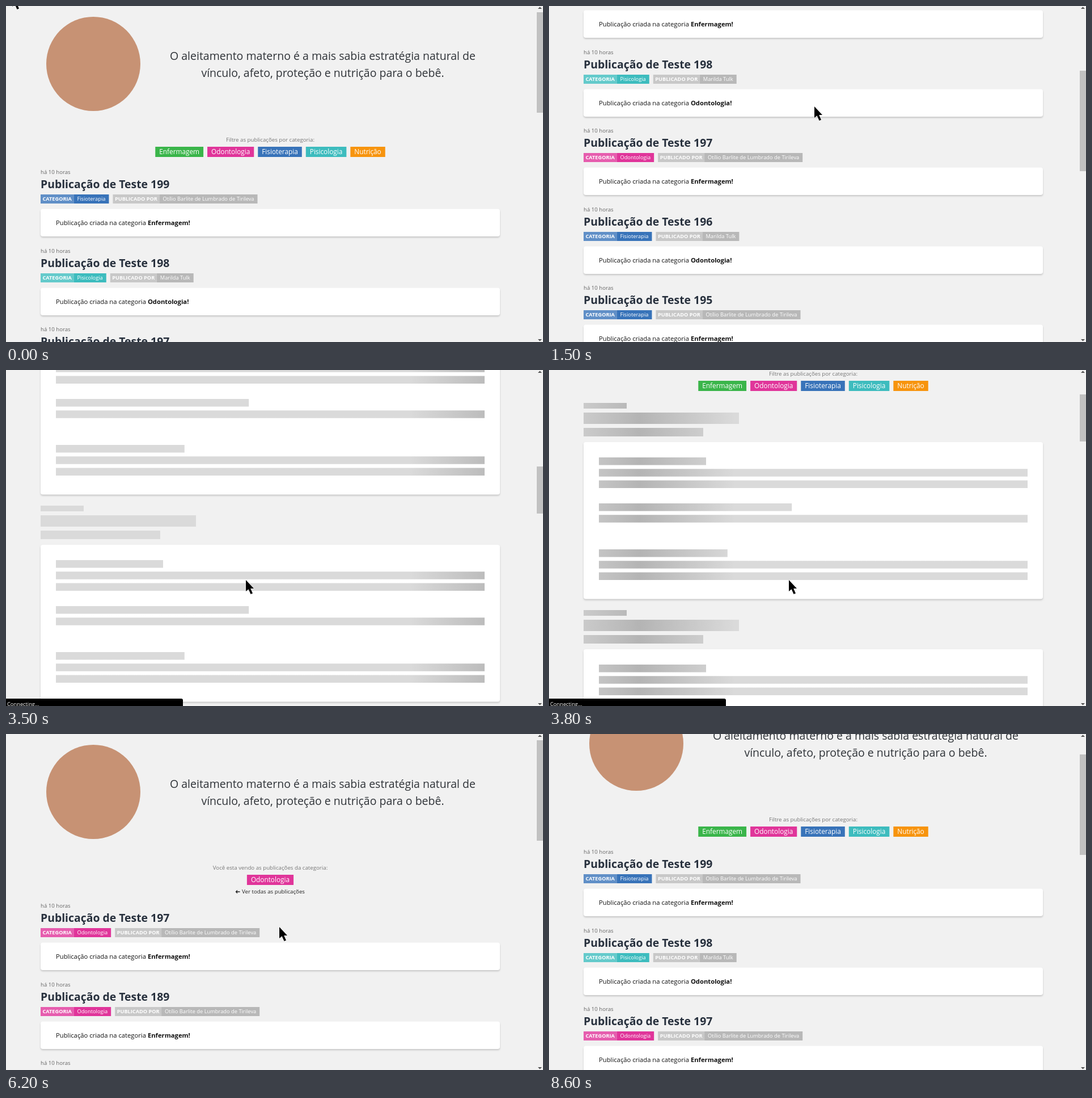
These frames come from a looping animation (947 by 592 pixels, 8900 ms). An HTML page with a canvas:

```html
<!DOCTYPE html>
<html lang="pt-BR">
<head>
<meta charset="utf-8">
<title>Publicações</title>
<style>
  html, body { margin: 0; width: 100%; height: 100%; overflow: hidden; background: #f1f1f1; }
  canvas { display: block; }
</style>
</head>
<body>
<canvas id="stage" width="947" height="592"></canvas>
<script>
const ctx = document.getElementById('stage').getContext('2d');
const W = 947, H = 592, LOOP = 8900, STEP = 100;
const LEFT = 61, CARD_W = 810, CENTER = 466;
const POST_GAP = 138.6, SKELETON_GAP = 365.5, ROW = 20.25;
const FONT = '"Open Sans", "Noto Sans", sans-serif';
const PINK = '#e0359a';

const COLORS = {
  Enfermagem: '#3ab54a',
  Odontologia: PINK,
  Fisioterapia: '#3873b9',
  Pisicologia: '#3dbcbe',
  Nutrição: '#f7940e'
};
const NAMES = Object.keys(COLORS);
const AUTHORS = ['Marilda Tulk', 'Otílio Barlite de Lumbrado de Tirileva'];

// Each letter is the initial of a category.
const makePosts = (first, initials, step = 1) => [...initials].map((c, i) =>
  ({ id: first - i * step, cat: NAMES.find(n => n[0] === c) }));
const PAGE_1 = makePosts(199, 'FPOFFEOPFP');
const PAGE_2 = makePosts(189, 'OEFPNOEFPO');
const FILTERED = makePosts(197, 'O'.repeat(10), 8);

const linear = p => p;
const easeOut = p => 1 - (1 - p) ** 3;
const easeInOut = p => p * p * (3 - 2 * p);
const clamp = p => Math.min(1, Math.max(0, p));
const within = (t, a, b) => t >= a && t < b;

// Moves run one after another; each starts where the last one ended.
const move = (start, end, to, ease = easeInOut) => ({ start, end, to, ease });
const SCROLL = [
  move(900, 1700, [467], linear),
  move(1880, 2886, [1333], easeOut),
  move(3358, 3958, [0]),
  move(6300, 6700, [85])
];
const POINTER = [
  move(200, 600, [468, 177]),
  move(2000, 2400, [462, 185]),
  move(2900, 3200, [423, 370]),
  move(4200, 4900, [389, 253]),
  move(5700, 6200, [482, 340]),
  move(6800, 7300, [460, 188]),
  move(8400, 8600, [300, -40])
];

const follow = (moves, origin, t) => moves.reduce((at, m) => {
  const p = m.ease(clamp((t - m.start) / (m.end - m.start)));
  return at.map((v, i) => v + (m.to[i] - v) * p);
}, origin);

function rect(x, y, w, h, fill) {
  ctx.fillStyle = fill;
  ctx.fillRect(x, y, w, h);
}

function box(x, y, w, h, r, fill, stroke) {
  ctx.beginPath();
  ctx.roundRect(x, y, w, h, r);
  ctx.fillStyle = fill;
  ctx.fill();
  if (stroke) {
    ctx.strokeStyle = stroke;
    ctx.lineWidth = 1;
    ctx.stroke();
  }
}

function card(x, y, w, h) {
  ctx.save();
  ctx.shadowColor = 'rgba(0,0,0,.18)';
  ctx.shadowBlur = 3;
  ctx.shadowOffsetY = 2;
  box(x, y, w, h, 4, '#fff');
  ctx.restore();
}

// Draws a string and returns its width.
function text(s, x, y, size, fill, weight = 400, align = 'left') {
  ctx.font = `${weight} ${size}px ${FONT}`;
  ctx.textAlign = align;
  ctx.fillStyle = fill;
  ctx.fillText(s, x, y);
  return ctx.measureText(s).width;
}

const centered = (s, x, y, size, fill, weight) => text(s, x, y, size, fill, weight, 'center');

// Draws a padded label and returns its right edge.
function tag(s, x, y, h, { size, pad, fill, weight = 400, base, tint = 0 }) {
  ctx.font = `${weight} ${size}px ${FONT}`;
  const w = ctx.measureText(s).width + pad * 2;
  rect(x, y, w, h, fill);
  if (tint) rect(x, y, w, h, `rgba(255,255,255,${tint})`);
  text(s, x + pad, y + base, size, '#fff', weight);
  return x + w;
}

function filterRow(names) {
  const pad = 7, gap = 7, size = 11.8;
  ctx.font = `400 ${size}px ${FONT}`;
  const total = names.reduce((sum, n) => sum + ctx.measureText(n).width + pad * 2 + gap, -gap);
  names.reduce((x, n) =>
    tag(n, x, 248, 18, { size, pad, fill: COLORS[n], base: 13.2 }) + gap, CENTER - total / 2);
}

function backLink() {
  ctx.beginPath();
  ctx.moveTo(412.5, 278);
  ctx.lineTo(405.5, 278);
  ctx.moveTo(408, 275.5);
  ctx.lineTo(405.5, 278);
  ctx.lineTo(408, 280.5);
  ctx.strokeStyle = '#222';
  ctx.lineWidth = 1.3;
  ctx.stroke();
  text('Ver todas as publicações', 416, 281, 9.7, '#222');
}

function header(filtered, hover) {
  ctx.beginPath();
  ctx.arc(154, 102, 83, 0, Math.PI * 2);
  ctx.fillStyle = '#c79274';
  ctx.fill();
  centered('O aleitamento materno é a mais sabia estratégia natural de', 558.5, 95, 19.5, '#2f3338');
  centered('vínculo, afeto, proteção e nutrição para o bebê.', 558.5, 125, 19.5, '#2f3338');
  if (hover) box(244.5, 223.5, 443, 56, 4, '#fff', '#e4e4e4');
  const caption = filtered ? 'Você esta vendo as publicações da categoria:' : 'Filtre as publicações por categoria:';
  centered(caption, CENTER, 239, 9.7, '#777');
  filterRow(filtered ? ['Odontologia'] : NAMES);
  if (filtered) backLink();
}

function post({ id, cat }, y) {
  const odd = id % 2, fill = COLORS[cat];
  text('há 10 horas', LEFT, y + 4, 9.65, '#666');
  text('Publicação de Teste ' + id, LEFT, y + 29, 19.4, '#27303d', 700);

  const label = { size: 9.2, pad: 3.5, weight: 700, base: 11 };
  const value = { size: 9.3, pad: 6, base: 10.5 };
  let x = tag('CATEGORIA', LEFT, y + 40, 16, { ...label, fill, tint: .2 });
  x = tag(cat, x, y + 40, 16, { ...value, fill }) + 7;
  x = tag('PUBLICADO POR', x, y + 40, 16, { ...label, fill: '#c8c8c8' });
  tag(AUTHORS[odd], x, y + 40, 16, { ...value, fill: '#b8b8b8' });

  card(LEFT, y + 65.5, CARD_W, 48.5);
  const w = text('Publicação criada na categoria ', 88, y + 94, 11.26, '#111');
  text(odd ? 'Enfermagem!' : 'Odontologia!', 88 + w, y + 94, 11.26, '#111', 700);
}

function pagination(y, current) {
  card(320, y, 292, 41.5);
  const button = (x, w, label, on) => {
    box(x + .5, y + 7.5, w - 1, 27, 2, on ? PINK : '#fff', on ? PINK : '#ddd');
    centered(label, x + w / 2, y + 24, 11.3, on ? '#fff' : '#222', 500);
  };
  button(328, 39, '‹');
  for (let n = 1; n <= 5; n++) button(343.5 + n * 35.5, 32, n, n === current);
  button(564.5, 39, '›');
}

function footer(y) {
  rect(0, y - 3, 935, 3, '#e6e6e6');
  rect(0, y, 935, 200, '#fff');
}

function paragraph(row, y, share, lines, fill) {
  const full = CARD_W - 54;
  for (let i = 0; i <= lines; i++)
    rect(88, y + (row + i) * ROW, i ? full : full * share, 13.5, fill);
}

function skeleton(t) {
  const mid = 88 + ((t - 2510) * .8) % 960;
  const shine = ctx.createLinearGradient(mid - 168, 0, mid + 168, 0);
  ['#dadada', '#b4b4b4', '#dadada'].forEach((c, i) => shine.addColorStop(i / 2, c));
  for (let i = 0; i < 10; i++) {
    const y = Math.round(286.5 + i * SKELETON_GAP);
    rect(LEFT, y, 76, 10, shine);
    rect(LEFT, y + 17, 274, 20, shine);
    rect(LEFT, y + 44, 211, 15, shine);
    card(LEFT, y + 69, CARD_W, 276.5);
    paragraph(0, y + 96, .25, 2, shine);
    paragraph(4, y + 96, .45, 1, shine);
    paragraph(8, y + 96, .3, 2, shine);
  }
  footer(412 + 10 * SKELETON_GAP);
}

function scrollbar(scroll, loading) {
  const track = H - 22, page = loading ? 4070 : 1906;
  rect(935, 0, 12, H, '#f1f1f1');
  rect(936, 11 + Math.round(scroll * (loading ? .139 : .2946)), 11, track * H / page, '#c1c1c1');
  for (const dir of [-1, 1]) {
    const y = H / 2 + dir * 291;
    ctx.beginPath();
    ctx.moveTo(938, y);
    ctx.lineTo(945, y);
    ctx.lineTo(941.5, y + dir * 3.5);
    ctx.fillStyle = '#505050';
    ctx.fill();
  }
}

function status(s, w, fill, ink) {
  box(0, 579, w, 20, [0, 3, 0, 0], fill);
  text(s, 2, 592, 9.3, ink);
}

const ARROW = new Path2D('M0 0V20L4.6 16.2 8.6 25 12 23.4 8.2 15H14Z');
const HAND = new Path2D('M1.2 1.2Q2.5-.6 3.8 1.2V7Q5.5 5.8 6.3 7.3 8 6.2 8.8 8 10.8 7.4 11 9.3V14L9.2 19H1.3L-3.3 12.6Q-4.6 10.4-3 9.7-1.4 9.5 1.2 12.4Z');

function pointer(x, y, hand) {
  const shape = hand ? HAND : ARROW;
  ctx.save();
  ctx.translate(Math.round(x), Math.round(y));
  ctx.lineJoin = 'round';
  ctx.lineWidth = hand ? 1.6 : 1;
  ctx.strokeStyle = hand ? '#000' : '#fff';
  ctx.fillStyle = hand ? '#fff' : '#000';
  ctx.stroke(shape);
  ctx.fill(shape);
  if (hand) {
    for (let i = 0; i < 3; i++) rect(3.3 + i * 2.5, 7.5, 1, 3.5, '#000');
  }
  ctx.restore();
}

function draw(t) {
  const scroll = Math.round(follow(SCROLL, [0], t)[0]);
  const [px, py] = follow(POINTER, [11, -19], t);
  const loading = within(t, 3400, 4000);
  const second = within(t, 4000, 5500);
  const filtered = within(t, 5500, 7600);
  const hover = second && py < 280;
  const shift = filtered ? 10 : 0;

  rect(0, 0, W, H, '#f1f1f1');
  ctx.save();
  ctx.translate(0, -scroll);
  header(filtered, hover);
  if (loading) {
    skeleton(t);
  } else {
    const posts = filtered ? FILTERED : second ? PAGE_2 : PAGE_1;
    posts.forEach((p, i) => post(p, Math.round(292 + shift + i * POST_GAP)));
    pagination(1686 + shift, second ? 2 : 1);
    footer(1795 + shift);
  }
  ctx.restore();

  scrollbar(scroll, loading);
  if (within(t, 2200, 3100)) status('maquina01:4200/documentos/582', 143.5, '#b2b2b2', '#ececec');
  if (loading || within(t, 5500, 5800)) status('Connecting...', 312, '#000', '#fff');

  const overLink = within(t, 2300, 2900) || within(t, 3100, 3400) || within(t, 7300, 7600);
  pointer(px, py, hover || overLink);
}

function tick(now) {
  draw(Math.floor((now % LOOP) / STEP) * STEP);
  requestAnimationFrame(tick);
}
requestAnimationFrame(tick);
</script>
</body>
</html>
```
